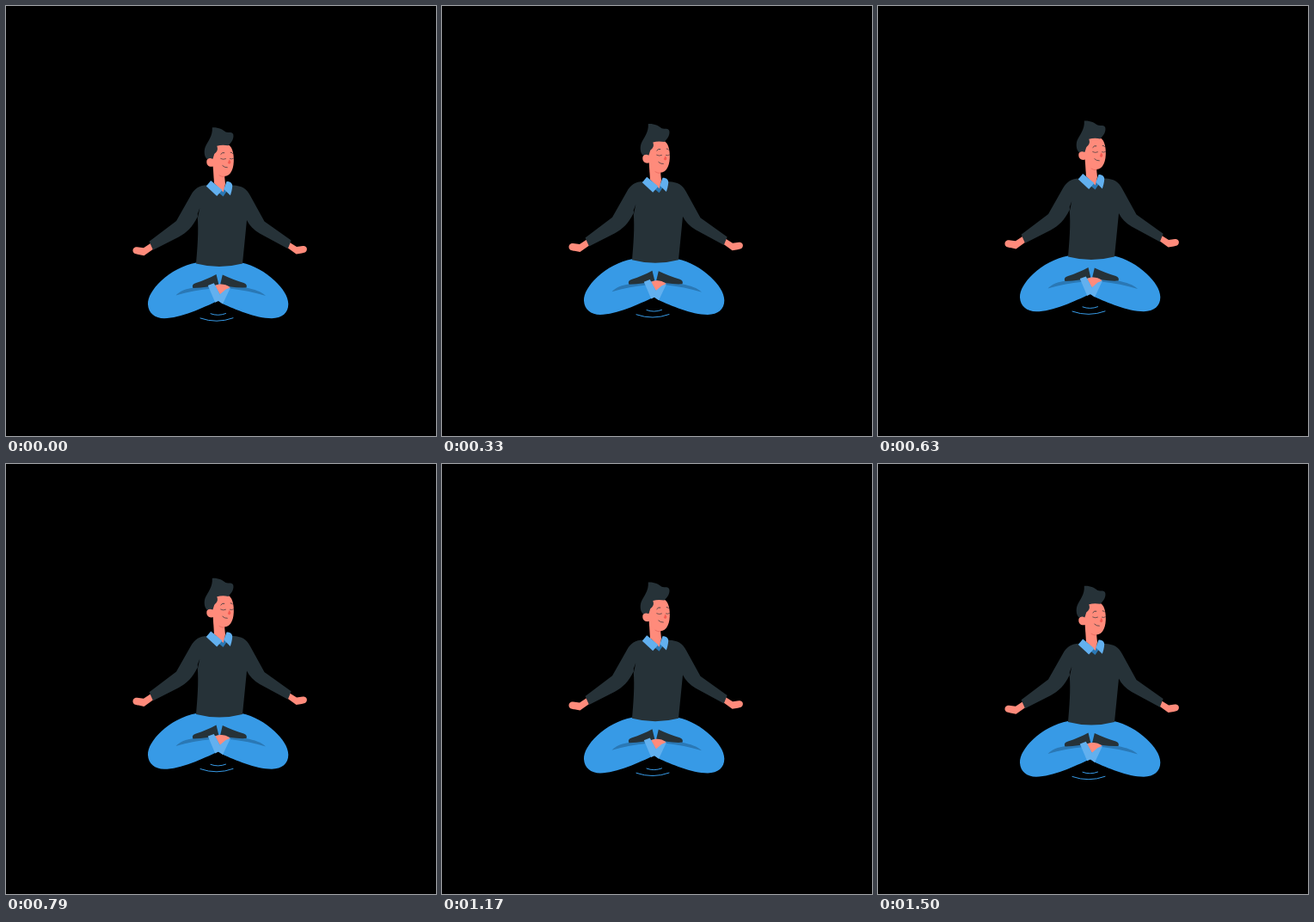
These frames come from a looping animation (500 by 500 pixels, 1540 ms). An HTML page:

```html
<!DOCTYPE html>
<html lang="en">
<head>
<meta charset="utf-8">
<title>Floating meditation</title>
<style>
  html, body { margin: 0; width: 100%; height: 100%; overflow: hidden; background: #000; }
  svg { display: block; width: 100vw; height: 100vh; }
  .skin { fill: #ff8b7b; }
  .dark { fill: #263238; }
  .blue { fill: #379ae6; }
  .light { fill: #62b0ef; }
  .shade { fill: #2a78b5; }
  .line { fill: none; stroke-linecap: round; }
</style>
</head>
<body>
<svg viewBox="0 0 500 500">
  <g id="figure">
    <!-- hands -->
    <g class="skin">
      <path d="M168 276 L160 281.2 L152.500 280.200 C148.500 280 147 282.800 147.700 285.600 C148.500 288.300 151.500 288.500 154 289 L160.500 290.300 L171.500 282.500 Z"/>
      <path d="M330 275 L338 280 L345 279 C348.500 278.600 350.300 281 349.800 283.500 C349.300 286.500 346.500 287 344 287.400 L337.500 288.500 L326.500 280.500 Z"/>
    </g>

    <!-- legs -->
    <path class="blue" d="M221 298.500 C206 301.500 191.500 309 180.500 319.500 C170.500 329 164.700 338.500 165 347 C165.500 357 173 363.200 184 363.200 C203 363 229 351 246.500 342.800 L252 346.200 C266 352.500 290 363 309 363.200 C321 363 328.300 357 328.300 346.500 C328 337 321.500 328 312.500 319.500 C301.500 309 288 301.500 274 298.500 Z"/>
    <g class="shade">
      <path d="M197.500 336.500 C202 331.500 209 328.800 219 327.500 L240 325 L240 328.500 C225 330 211 332.500 197.500 336.500 Z"/>
      <path d="M302 337 C297 332 289 329.500 279 327.500 L258 324.500 L260 328.500 C274 330 289 333 302 337 Z"/>
    </g>
    <g class="dark">
      <path d="M244.500 312 L247.300 323.500 C239 326 230 327.600 217.500 328 C216 325 217.500 323 221 322 C229 319.500 237 316 244.500 312 Z"/>
      <path d="M251.800 312.500 C260 316.500 268 319.500 276.500 322 C279.500 323 280.500 325 279.500 327.500 C268 328 258 326.500 249.200 323.500 Z"/>
    </g>
    <path class="skin" d="M243 325 C248 322.500 255 322.800 260.500 327 L249.500 336.500 Z"/>
    <path class="light" d="M261 327.500 L255.500 329.500 L249 335 L246 342 L252 346.500 Z"/>
    <path class="light" d="M234.800 325 L241.800 322.300 L249.500 337 L247 343 L243.200 344.800 Z"/>

    <!-- sweater -->
    <path class="dark" d="M234 208.300 C225 208.500 219 212.500 215 220 L198 250 L166.600 273.700 L171 283.700 L201 268.500 C210 263.500 217 257 222.700 245 C224.200 262 222.500 282 221 299.500 Q248 306.500 275 299.500 L280 249 C283 255 288 260.500 295 264.500 L327.800 282.200 L331.600 272.600 L300.500 250.500 L284 220.500 C280 212.500 274 208.800 264 208.500 Z"/>
    <path d="M223 246 L222.800 241.500 L225.300 235 Z"/>

    <!-- collar, neck and head -->
    <path class="shade" d="M246 216 L252.500 221.500 L257 215 L252 211 Z"/>
    <path class="skin" d="M240.500 184 L242 206 L252.700 216.500 L255 207 L253.800 195 Z"/>
    <path class="light" d="M238.200 203 L232.800 209.500 L245.200 221 L251.500 214 Z"/>
    <path class="light" d="M256.500 204 C260.500 203.800 263.300 206 263.200 209.500 C263 213 262 217 260.800 220.300 L253.300 213 Z"/>
    <path class="skin" d="M243 160 L258 161 C262.300 163 264.500 169 264.800 177 C265.300 188 262 197.800 253.800 198 C246.500 198 241.500 193 241 186.500 C236.500 187.800 233.200 185.300 233.300 181.200 C233.400 177.300 237 175.500 241 176.500 Z"/>
    <path class="dark" d="M239.800 141.300 C247.500 141 251.500 143.500 255.500 146.500 C259 147.500 263.500 146 264.300 149.500 C265.200 154 262.500 158.500 258.500 162.300 C254 161.500 249.500 161.500 245.300 162.700 C247 167.500 245 169.800 242.500 171.800 C240.800 174 241.200 176.500 240.300 178 C238 176.500 235.800 177 234 178.300 C230.500 175.500 230 169 231.500 164.500 C234.500 157.500 240.500 151.500 239.800 141.300 Z"/>
    <path d="M259.500 178.500 Q263.200 182.500 259.500 183.800 L257.800 182.500 Z" fill="#f45b52"/>
    <g class="line" stroke="#263238" stroke-width=".8">
      <path d="M249.800 172.300 Q251.500 169.800 253.800 170.600 M261.200 170.200 Q262.800 170 263.600 171.500"/>
      <path d="M249.700 177.500 Q252.500 179.100 255.500 177.700 M260.500 177.700 Q262.500 178.500 264.500 177.300" stroke-width=".65"/>
      <path d="M251.800 185.700 Q254 188 257.300 187.800" stroke-width=".7"/>
    </g>
    <path class="line" d="M248 197 Q251 199 254 198.500" stroke="#e8695f" stroke-width=".8"/>

    <!-- hover lines -->
    <path class="line" stroke="#379ae6" d="M226 363 Q245 369.700 264 362.800 M238 357.800 Q246.500 361 255.500 357.600"/>
  </g>
</svg>
<script>
  const LOOP = 1540, STEPS = 37, STEP = 1000 / 24;
  const LOW = 0.5, RISE = 9.7;
  const figure = document.getElementById('figure');
  const start = performance.now();

  // Linear rise and fall, held at 24 steps per second
  function heightAt(ms) {
    const n = Math.min(STEPS - 1, Math.floor((ms + 4.9) / STEP));
    const phase = (n + 1) / STEPS;
    return LOW - RISE * (1 - Math.abs(1 - 2 * phase));
  }

  function draw(now) {
    const ms = Math.max(0, now - start) % LOOP;
    figure.setAttribute('transform', `translate(0 ${heightAt(ms).toFixed(3)})`);
    requestAnimationFrame(draw);
  }
  draw(start);
</script>
</body>
</html>
```
